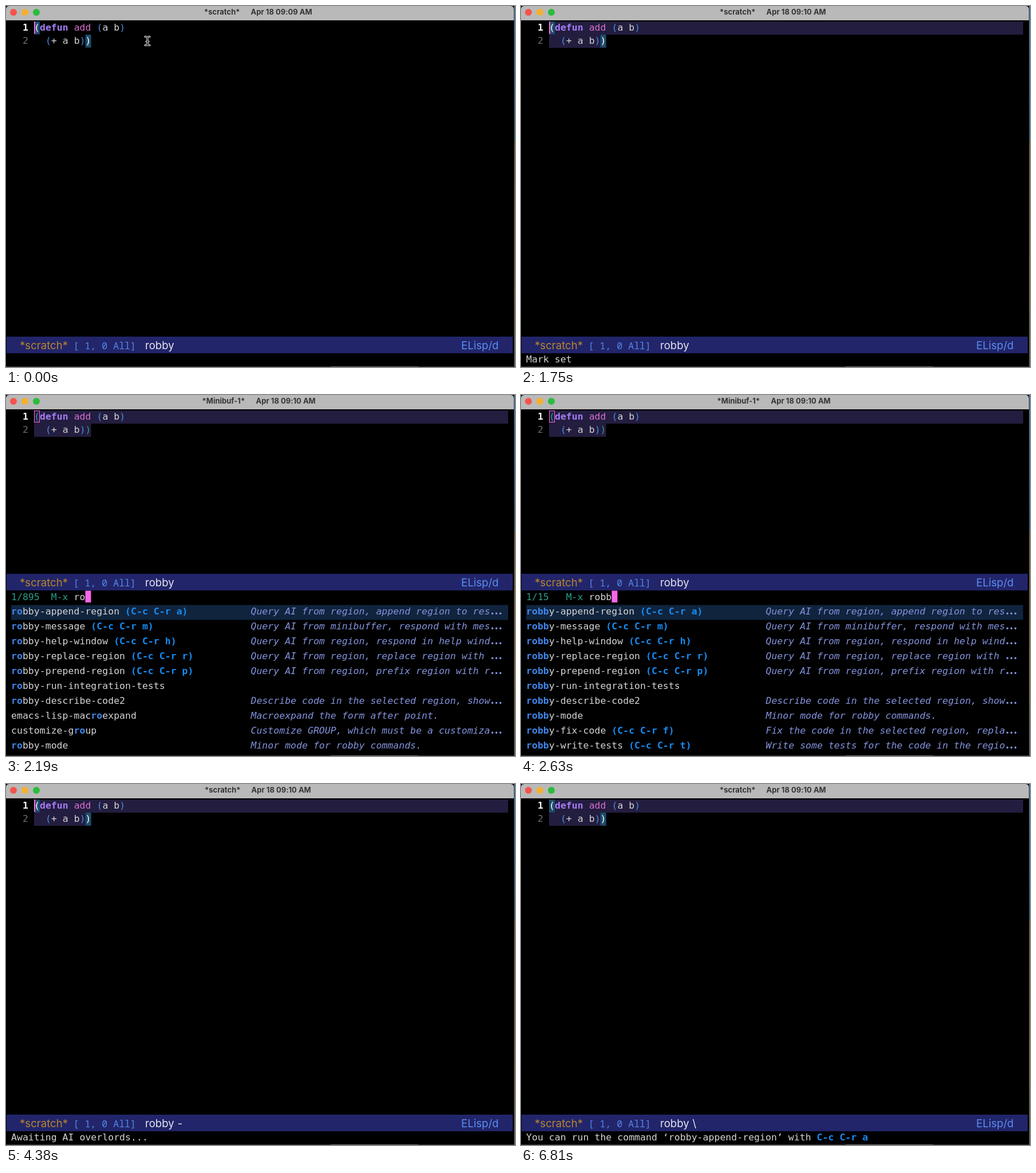
These frames come from a looping animation (889x630 px, 7000 ms). An HTML page:

```html
<!DOCTYPE html>
<html lang="en">
<head>
<meta charset="utf-8">
<title>Editor session</title>
<style>
  html, body { margin: 0; width: 100%; height: 100%; overflow: hidden; background: #000; }
  svg { display: block; width: 889px; height: 630px; }
  text { white-space: pre; font: 16.55px "DejaVu Sans Mono", monospace; fill: #d4d4d4; }
  .title { font: 700 13px Inter, sans-serif; font-feature-settings: "calt" 0; fill: #343434; }
  .mode { font: 400 18.6px Inter, sans-serif; font-feature-settings: "calt" 0; fill: #e4e4ee; }
  .gold { fill: #b8862f; }
  .blue { fill: #5c8df0; }
  .pos { font: 300 16.6px "Noto Sans Mono", monospace; fill: #5587e6; }
  .num { font-weight: 700; fill: #fff; }
  .dim { fill: #6c6c70; }
  .kw { font-weight: 700; fill: #a57df6; }
  .fn { fill: #d86fd0; }
  .par { fill: #4b8be0; }
  .match { fill: #fff; }
  .teal { fill: #2a9d8b; }
  .hit { font-weight: 700; fill: #3f86ea; }
  .key { font-weight: 700; fill: #168cf2; }
  .note { font-style: italic; fill: #8493dc; }
  .dots { font: 700 21px Inter, sans-serif; fill: #8493dc; }
</style>
</head>
<body>
<svg id="stage" viewBox="0 0 889 630"></svg>
<script>
const LOOP = 7000, CELL = 9.963, LEFT = 9, CODE = 49;
const PINK = '#f966ea';

// [time, changes to the state]
const steps = [
  [0,    { cursor: 1, pointer: 1, marked: 0, mini: 0, input: '', echo: '' }],
  [60,   { cursor: 0 }],
  [560,  { cursor: 1, pointer: 0, marked: 1, echo: 'mark' }],
  [1060, { cursor: 0 }],
  [1560, { cursor: 1 }],
  [1870, { mini: 1, echo: '' }],
  [2000, { input: 'r' }],
  [2120, { input: 'ro' }],
  [2310, { input: 'rob' }],
  [2500, { input: 'robb' }],
  [3000, { cursor: 0 }],
  [3560, { cursor: 1 }],
  [4060, { cursor: 0 }],
  [4310, { mini: 0, cursor: 1, echo: 'wait' }],
  [4810, { cursor: 0 }],
  [5630, { cursor: 1 }],
  [6130, { cursor: 0 }],
  [6250, { echo: 'hint' }]
];

const spinner = { start: 4264, period: 195.7, glyphs: '-\\|/' };
const counts = { '': '1/9034', r: '1/6471', ro: '1/895', rob: '1/15', robb: '1/15' };

// name, key, annotation, cut off
const commands = [
  ['robby-append-region', 'a', 'Query AI from region, append region to res', 1],
  ['robby-message', 'm', 'Query AI from minibuffer, respond with mes', 1],
  ['robby-help-window', 'h', 'Query AI from region, respond in help wind', 1],
  ['robby-replace-region', 'r', 'Query AI from region, replace region with ', 1],
  ['robby-prepend-region', 'p', 'Query AI from region, prefix region with r', 1],
  ['robby-run-integration-tests', '', ''],
  ['robby-describe-code2', '', 'Describe code in the selected region, show', 1],
  ['emacs-lisp-macroexpand', '', 'Macroexpand the form after point.'],
  ['customize-group', '', 'Customize GROUP, which must be a customiza', 1],
  ['robby-mode', '', 'Minor mode for robby commands.'],
  ['robby-fix-code', 'f', 'Fix the code in the selected region, repla', 1],
  ['robby-write-tests', 't', 'Write some tests for the code in the regio', 1]
];

const echoes = {
  '': [],
  mark: [['', 'Mark set']],
  wait: [['', 'Awaiting AI overlords...']],
  hint: [['', 'You can run the command ‘robby-append-region’ with '], ['key', 'C-c C-r a']]
};

const rect = (x, y, w, h, fill, extra = '') =>
  `<rect x="${x}" y="${y}" width="${w}" height="${h}" fill="${fill}" ${extra}/>`;
const text = (x, y, cls, s) => `<text x="${x}" y="${y}" class="${cls}">${s}</text>`;
const line = (x, y, runs) =>
  text(x, y, '', runs.map(([c, s]) => `<tspan class="${c}">${s}</tspan>`).join(''));
const col = (n, from = LEFT) => from + n * CELL;

function frame(s) {
  const [name, x1, x2] = s.mini ? ['*Minibuf-1*', 342.5, 436.5]
    : s.marked ? ['*scratch*', 347, 428.5] : ['*scratch*', 346, 427.5];
  const lights = ['#f5544c', '#f4b02f', '#29bd3b']
    .map((c, i) => `<circle cx="${13 + 20 * i}" cy="11" r="6" fill="${c}"/>`).join('');
  return `<defs><linearGradient id="desk" x2="0" y2="1">
      <stop offset="0" stop-color="#4d86b4"/><stop offset=".37" stop-color="#3b6688"/>
      <stop offset=".38" stop-color="#7b6540"/><stop offset=".8" stop-color="#8b7345"/>
      <stop offset="1" stop-color="#66686a"/></linearGradient></defs>`
    + rect(0, 0, 889, 630, '#000')
    + rect(887.5, 0, 1.5, 630, 'url(#desk)')
    + rect(0, 629, 887, 1, '#34383c') + rect(567, 629, 153, 1, '#77797a')
    + '<path d="M0 25V6Q0 0 6 0H881Q887 0 887 6V25Z" fill="#b9b9b9"/>'
    + lights + text(x1, 15, 'title', name)
    + text(x2, 15, 'title', `Apr 18 09:${s.marked ? '10' : '09'} AM`);
}

function code(s) {
  const outer = s.mini ? 'teal' : 'match';
  let out = '';
  if (s.marked) out += rect(CODE, 27, 828, 23, '#231d3f') + rect(CODE, 50, 99.6, 23, '#231d3f');
  if (!s.mini) {
    out += rect(CODE, 27, CELL, 22.5, '#1d4d6b')
      + rect(col(9, CODE), 50, CELL, 22.5, '#1d4d6b');
  }
  out += text(col(2), 43, 'num', '1') + text(col(2), 66, 'dim', '2')
    + line(CODE, 43, [[outer, '('], ['kw', 'defun'], ['', ' '], ['fn', 'add'], ['', ' '],
      ['par', '('], ['', 'a b'], ['par', ')']])
    + line(CODE, 66, [['', '  '], ['par', '('], ['', '+ a b'], ['par', ')'], [outer, ')']]);
  if (s.mini) out += rect(49.5, 27.5, 9, 20, 'none', `stroke="${PINK}"`);
  else if (s.cursor) out += rect(49, 27, 2, 21.5, PINK);
  return out;
}

function modeLine(s) {
  const y = s.mini ? 312 : 577, base = y + 21.5;
  return rect(1, y, 884, 29, '#22256a')
    + text(24, base, 'mode gold', '*scratch*') + text(117.5, base, 'pos', '[ 1, 0 All]')
    + text(243, base, 'mode', 'robby') + text(299.5, base, 'mode', s.spin)
    + text(795, base, 'mode blue', 'ELisp/d');
}

function row([name, key, note, cut], i, input) {
  const y = 383 + 26 * i, at = name.indexOf(input), end = at + input.length;
  const runs = [['', name.slice(0, at)], ['hit', name.slice(at, end)], ['', name.slice(end)]];
  if (key) runs.push(['key', ` (C-c C-r ${key})`]);
  return line(LEFT, y, runs) + text(col(42), y, 'note', note)
    + (cut ? text(col(84), y, 'dots', '…') : '');
}

function miniBuffer(s) {
  const rows = commands.filter(c => c[0].includes(s.input)).slice(0, 10);
  return line(LEFT, 357.5, [['teal', counts[s.input].padEnd(7) + 'M-x '], ['', s.input]])
    + (s.cursor ? rect(col(11 + s.input.length), 341.5, CELL, 20.5, PINK) : '')
    + rect(LEFT, 366.5, 868, 26, '#10243e')
    + rows.map((c, i) => row(c, i, s.input)).join('');
}

function pointer() {
  const d = 'M243 53.5q4 0 4 3v9q0 3-4 3M251 53.5q-4 0-4 3v9q0 3 4 3M245 62h4';
  return `<g fill="none" stroke-linecap="round"><path d="${d}" stroke="#f2f2f2" stroke-width="3.2"/>`
    + `<path d="${d}" stroke="#000" stroke-width="1.2"/></g>`;
}

function stateAt(t) {
  const s = Object.assign({}, ...steps.filter(p => p[0] <= t).map(p => p[1]));
  const turn = Math.floor((t - spinner.start) / spinner.period);
  s.spin = t >= 4310 ? spinner.glyphs[turn % 4] : '';
  return s;
}

const stage = document.getElementById('stage');
let shown = '';

function draw(t) {
  const s = stateAt(t), id = JSON.stringify(s);
  if (id === shown) return;
  shown = id;
  stage.innerHTML = frame(s) + code(s) + modeLine(s)
    + (s.mini ? miniBuffer(s) : line(LEFT, 622, echoes[s.echo]))
    + (s.pointer ? pointer() : '');
}

const begin = performance.now();
function tick() {
  draw((performance.now() - begin) % LOOP);
  requestAnimationFrame(tick);
}
tick();
</script>
</body>
</html>
```
